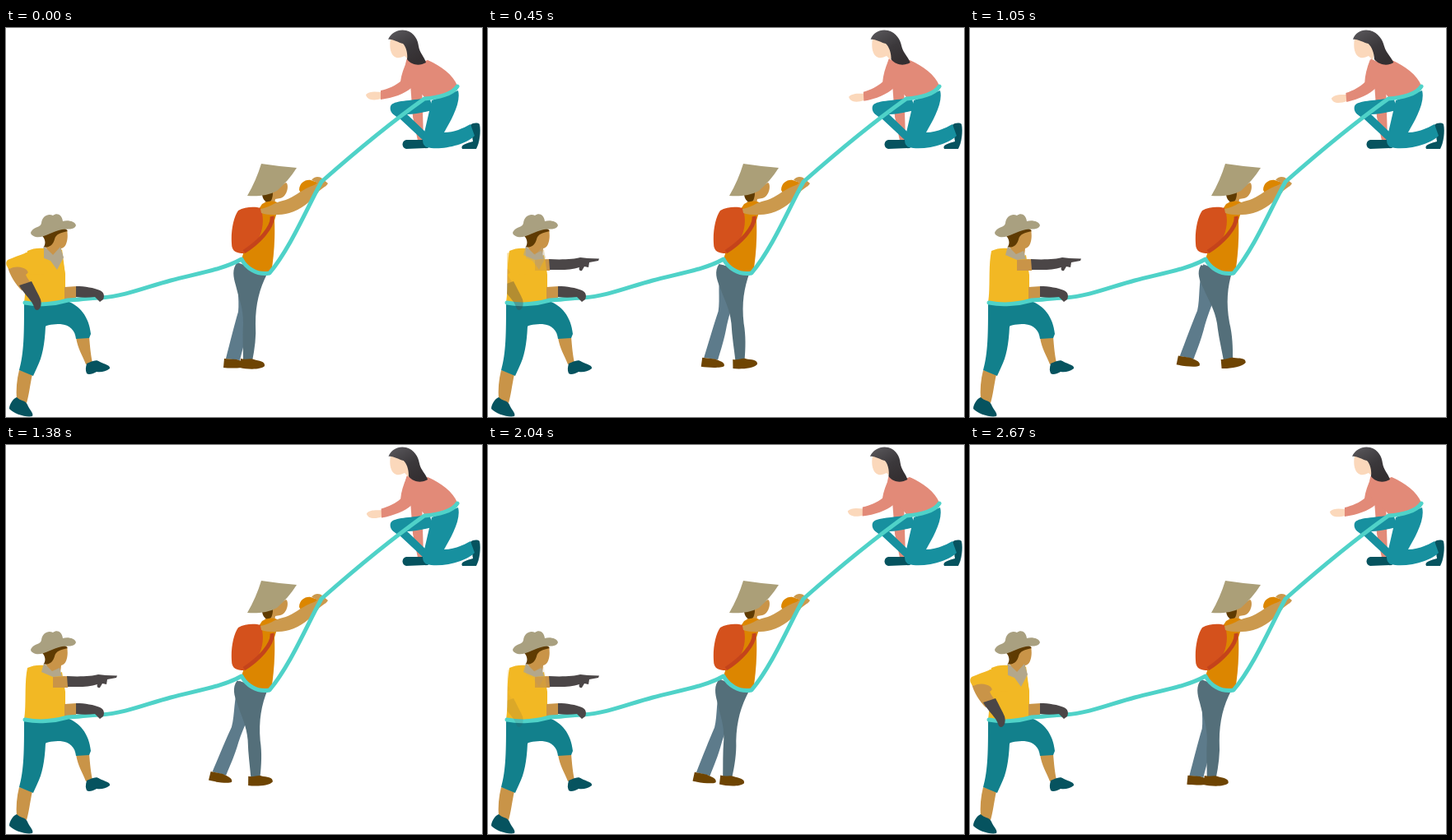
These frames come from a looping animation (578 by 473 pixels, 2.7 s). An HTML page:

```html
<!DOCTYPE html>
<html lang="en">
<head>
<meta charset="utf-8">
<title>Climbers on a rope</title>
<style>
@property --sway { syntax: "<number>"; inherits: true; initial-value: 0; }
@property --step { syntax: "<number>"; inherits: true; initial-value: 0; }
@property --hip { syntax: "<number>"; inherits: true; initial-value: 1; }

html, body { margin: 0; width: 100%; height: 100%; overflow: hidden; background: #fff; }
svg {
  display: block; width: 578px; height: 473px;
  animation: sway 2.7s linear infinite, step 2.7s linear infinite, hip 2.7s linear infinite;
}

@keyframes sway {
  0%, 100% { --sway: 0; }
  8.9% { --sway: .29; }
  17% { --sway: .63; }
  24.4% { --sway: .86; }
  30% { --sway: .96; }
  35.2% { --sway: 1; }
  38.9% { --sway: .99; }
  44% { --sway: .84; }
  52% { --sway: .42; }
  58% { --sway: .12; }
  63.3% { --sway: -.03; }
  70% { --sway: -.14; }
  87% { --sway: -.14; }
  94% { --sway: -.08; }
}
@keyframes step {
  0%, 100% { --step: 0; }
  8.9% { --step: 1; }
  24.4% { --step: 3.9; }
  38.9% { --step: 6.3; }
  52% { --step: 8.7; }
  60% { --step: 9.6; }
  64% { --step: 9.6; }
  75% { --step: 7.5; }
  86.7% { --step: 4.3; }
  95% { --step: 1.3; }
}
@keyframes hip {
  0%, 97.8%, 100% { --hip: 1; }
  26.7%, 72.2% { --hip: 0; }
}

/* Over the body the arms dissolve; beyond it they switch at the halfway point. */
.hip-in { opacity: var(--hip); }
.point-in { opacity: calc(1 - var(--hip)); }
.hip-out { opacity: clamp(0, (var(--hip) - .5) * 9999, 1); }
.point-out { opacity: clamp(0, (.5 - var(--hip)) * 9999, 1); }

.front-leg { transform-origin: 300px 290px; transform: rotate(calc(var(--sway) * -10.1deg)); }
.back-leg { transform-origin: 291px 290px; transform: rotate(calc(var(--step) * 1deg)); }
.reach { transform-origin: 490px 62px; transform: rotate(calc(var(--sway) * -5deg)); }
.hair { transform-origin: 482px 6px; transform: skewX(calc(var(--sway) * 7deg)); }

.rope { fill: none; stroke: #4fd2c8; stroke-width: 5; stroke-linecap: round; stroke-linejoin: round; }
.skin { fill: #c99448; }
.glove { fill: #4b4647; }
.yellow { fill: #f2b824; }
.tan { fill: #b3a78b; }
.orange { fill: #dc8600; }
.brown { fill: #5f3b02; }
.boot { fill: #6e4402; }
.teal { fill: #17909f; }
.denim { fill: #12808c; }
.shoe { fill: #06535f; }
.pale { fill: #fbd8bb; }
.salmon { fill: #e28a78; }
</style>
</head>
<body>
<svg viewBox="0 0 578 473">
  <defs>
    <linearGradient id="hairTone" x1="0" y1="0" x2=".6" y2="1">
      <stop offset="0" stop-color="#5c5a5e"/>
      <stop offset=".6" stop-color="#3b383b"/>
      <stop offset="1" stop-color="#342f31"/>
    </linearGradient>
    <clipPath id="body"><path d="M23 258H72V350H23Z"/></clipPath>
    <g id="hipArm">
      <path class="skin" d="M2 290C10 288 20 289 27 289C30 293 27 298 24 300C26 305 29 308 31 311L19 319C12 312 4 300 2 290Z"/>
      <path class="yellow" d="M46 268C33 269 15 277 2 282C-1 285 0 290 4 293C11 289 20 290 25 294L28 299L46 300Z"/>
      <path class="glove" d="M16 313L31 308C35 316 40 325 42 330C44 337 41 343 38 343C34 343 35 339 31 333C27 328 20 320 16 313Z"/>
    </g>
    <g id="pointArm">
      <path class="skin" d="M57 282L75 281V295H57Z"/>
      <path class="glove" d="M74 281C90 282 105 281 112 279L121 280L135 280.500L134 283L123 285L122 291L117 290L114 295C111 296 110 293 111 291C100 295 86 294 75 294Z"/>
    </g>
  </defs>

  <!-- woman at the top -->
  <g>
    <path class="salmon" d="M491 68H505L507 136L500 137L494 108Z"/>
    <path class="teal" d="M514 84C496 89 470 87 467 95C465 102 471 106 478 110L508 138L511 128L487 105C497 105 508 102 519 100Z"/>
    <path class="shoe" d="M486 136H506L513 146L486 147C480 146 480 137 486 136Z"/>
    <path class="shoe" d="M564 118C567 115 573 115 575 117C577 126 575 140 571 147H554C551 142 560 140 567 138Z"/>
    <path class="teal" d="M549 76C553 91 540 113 532 127C544 127 555 122 564 117L569 131C557 143 527 149 511 145C504 142 506 134 508 127L517 88Z"/>
    <g class="reach">
      <path class="pale" d="M457 78C450 78 442 76 437 81C438 87 445 89 456 86Z"/>
      <path class="salmon" d="M488 38C483 48 480 57 479 65C473 70 464 74 455 76L455 87C470 85 484 80 492 73L496 50Z"/>
    </g>
    <path class="salmon" d="M487 37C498 45 506 41 512 39C528 46 543 57 548 70C540 80 522 82 509 86C505 78 496 74 490 72C485 60 483 46 487 37Z"/>
    <path class="pale" d="M467 13C465 23 467 34 474 36C478 37 481 35 484 34L489 39L492 26L480 12Z"/>
    <path class="hair" fill="url(#hairTone)" d="M464 14C468 5 477 1 486 3C496 6 500 14 501 22C502 30 508 35 510 42C503 46 493 46 487 38C488 31 486 23 482 19C476 18 470 13 464 14Z"/>
  </g>

  <!-- man in the middle -->
  <g>
    <g class="back-leg">
      <path fill="#5d7b8b" d="M283 288L312 295C303 320 297 340 293 362C291 378 287 392 284 404L267 402C272 383 277 362 282 345C284 330 279 310 283 288Z"/>
      <path class="boot" d="M265 402L280 403C286 405 293 406 292 411C289 414 272 414 264 413Z"/>
    </g>
    <g class="front-leg">
      <path fill="#546f7a" d="M281 285C274 293 276 303 279 313C283 330 288 340 288 358C287 375 288 390 288 404L299 405C302 390 304 375 303 360C303 335 308 317 317 299Z"/>
      <path class="boot" d="M285 402C292 404 297 401 301 403C307 405 315 405 314 411C309 416 292 415 284 413Z"/>
    </g>
    <path class="skin" d="M318 200L340 188C344 190 342 205 333 207L327 208L326 216L314 214Z"/>
    <path class="brown" d="M311 203L324 200C324 207 322 212 318 212C314 211 312 208 311 203Z"/>
    <path class="orange" d="M311 214C318 210 326 209 332 214L326 234C327 258 325 280 322 298C309 302 293 294 286 281L290 268L307 220Z"/>
    <path fill="#d4511c" d="M282 222C290 217 303 217 309 219C313 228 313 242 308 253C303 262 296 268 289 274C280 274 274 272 274 262C273 248 276 230 282 222Z"/>
    <path fill="none" stroke="#c4431b" stroke-width="5" d="M323 229C325 241 308 260 289 272"/>
    <path fill="#ab9f78" d="M293 204C300 192 306 178 310 165C325 167 340 169 353 170C346 181 338 190 329 198C318 204 305 205 293 204Z"/>
    <path class="orange" d="M356 197C356 189 363 184 370 185L379 188L377 202L361 206Z"/>
    <path fill="#cb994d" d="M309 220C318 219 326 212 336 210C346 208 355 200 363 196C369 192 375 192 378 188L371 185C374 180 381 180 384 183L391 189C388 194 382 195 379 200C370 211 358 221 344 225C333 228 318 228 310 225Z"/>
  </g>

  <!-- man at the bottom -->
  <g>
    <use href="#hipArm" class="hip-out"/>
    <use href="#pointArm" class="point-out"/>
    <path class="skin" d="M16 416L32 421C29 435 28 446 25 456L13 452C12 440 13 428 16 416Z"/>
    <path class="skin" d="M85 376L101 375C102 388 103 398 105 407L97 409C93 398 87 390 85 376Z"/>
    <path class="shoe" d="M13 449C18 454 23 452 26 458C28 464 34 468 32 472C25 474 9 469 4 463C4 458 8 451 13 449Z"/>
    <path class="shoe" d="M98 408C104 406 109 402 114 406C120 409 127 410 126 414C121 418 115 419 110 418C105 421 100 422 98 420C96 416 97 412 98 408Z"/>
    <path class="denim" d="M22 335C40 338 60 335 74 332C89 337 101 351 103 372L101 377L85 378C84 368 78 361 66 360C58 360 49 361 48 363C47 385 44 400 38 412L33 423L16 416C22 395 22 370 22 335Z"/>
    <path class="skin" d="M48 266L60 250L74 245C76 255 74 267 67 268L66 277L55 280Z"/>
    <path class="yellow" d="M26 271C32 268 40 267 46 268L57 281L68 276L72 300V331C55 336 35 337 22 334C25 315 22 290 26 271Z"/>
    <path class="tan" d="M43 276L46 265L56 275L65 271L68 281L57 282Z"/>
    <path class="brown" d="M43 252L71 243L75 247C66 249 60 251 59 257C57 264 52 268 46 266C49 261 47 255 43 252Z"/>
    <path fill="#a9a080" d="M31 247C35 241 42 243 43 237C44 228 52 225 57 228C62 224 68 227 69 235C75 233 84 235 85 240C83 246 74 244 68 245C56 247 46 256 36 254C30 252 29 249 31 247Z"/>
    <path class="skin" d="M71 315L86 314L85 329L71 330Z"/>
  </g>

  <g class="rope">
    <path d="M548 71C543 80 525 85 508 86C470 113 417 157 383 187C364 222 345 268 320 298C304 301 291 291 286 281C265 293 235 298 200 307C170 315 145 326 115 328C100 328 88 331 75 331C58 336 38 337 23 334"/>
  </g>

  <path class="glove" d="M85 314C96 314 107 316 114 319C119 321 120 326 118 330L114 333L108 327C100 328 92 328 85 327Z"/>
  <g clip-path="url(#body)">
    <use href="#pointArm" class="point-in"/>
    <g class="hip-in">
      <path class="yellow" d="M46 268L57 281L68 269L72 300H46Z"/>
      <path class="skin" d="M52 266L60 262H67L66 270L57 277Z"/>
      <path class="tan" d="M46 266L57 276L66 266L70 279L62 294L54 283L44 279Z"/>
      <use href="#hipArm"/>
    </g>
  </g>
</svg>
</body>
</html>
```
